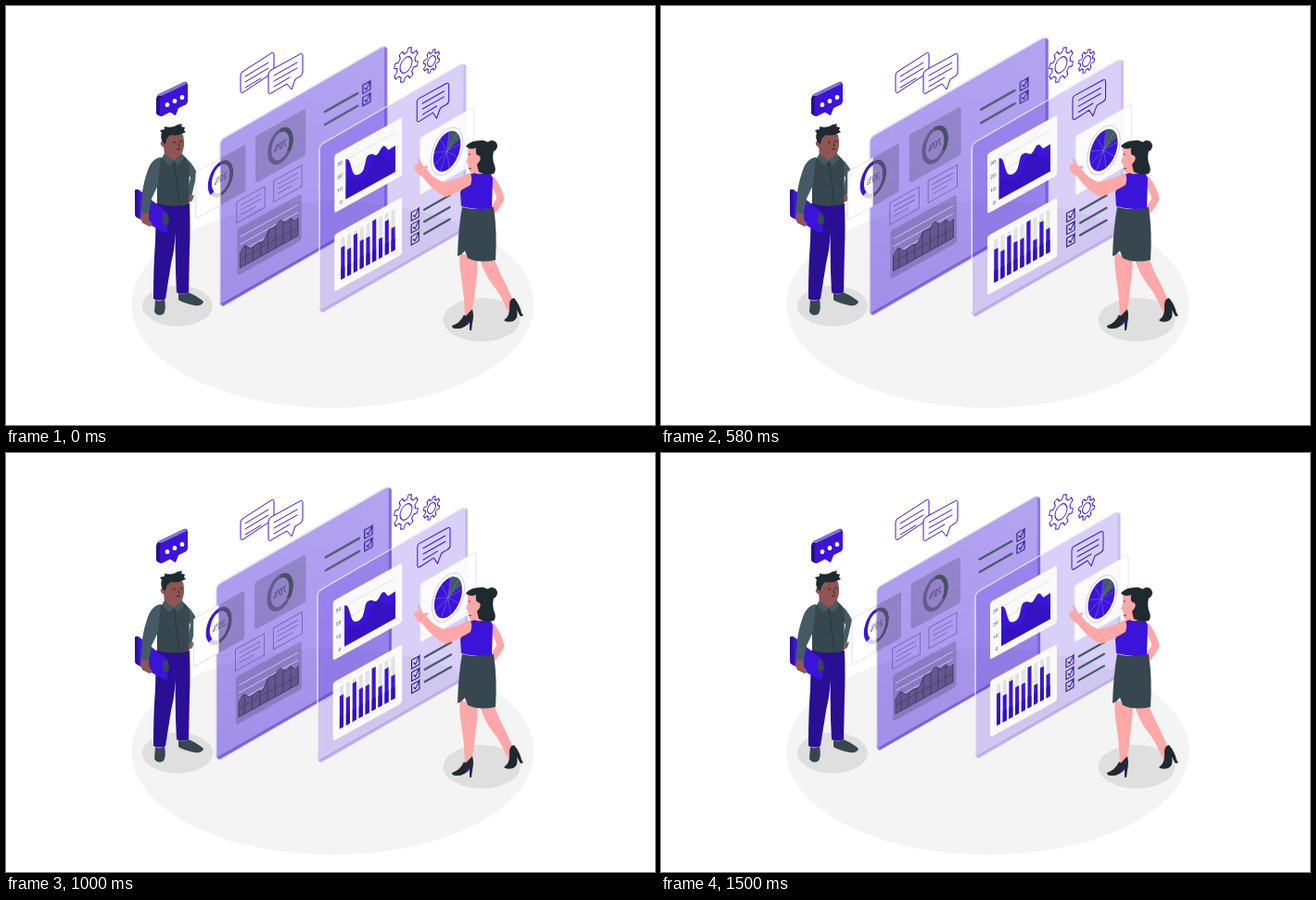
Recreate the animation shown at these times as an HTML page. Size 700 by 452 pixels, loop 1540 ms.

```html
<!DOCTYPE html>
<html lang="en">
<head>
<meta charset="utf-8">
<title>Dashboard presentation</title>
<style>
html, body { margin: 0; width: 100%; height: 100%; overflow: hidden; background: #fff; }
svg { display: block; width: 100vw; height: 100vh; }
text { font-family: Roboto, Arial, sans-serif; }
.beat { animation: beat 1540ms infinite linear; }
#back { transform-origin: 307.5px 182.5px; }
#slab { transform-origin: 321px 182.7px; }
#front { transform-origin: 421.3px 196.5px; }
@keyframes beat {
  0% { transform: scale(1.0115); animation-timing-function: cubic-bezier(.3, .35, .7, .8); }
  21.43% { transform: scale(1.0877); animation-timing-function: ease-out; }
  26.6% { transform: scale(1.098); animation-timing-function: ease-in; }
  35.06% { transform: scale(1.062); }
  37.66% { transform: scale(1.046); animation-timing-function: ease-out; }
  47.4% { transform: scale(1.002); }
  52% { transform: scale(.999); }
  57.14% { transform: scale(1); animation-timing-function: cubic-bezier(.35, .2, .7, .8); }
  73.38% { transform: scale(1.0777); animation-timing-function: ease-out; }
  78.3% { transform: scale(1.088); animation-timing-function: cubic-bezier(.5, 0, .8, .7); }
  86.36% { transform: scale(1.057); animation-timing-function: cubic-bezier(.3, .3, .6, 1); }
  97.4% { transform: scale(1); animation-timing-function: ease-in; }
  100% { transform: scale(1.0115); }
}
.main { fill: #3c14d9; }
.deep { fill: #2a0f94; }
.slate { fill: #37474f; }
.dark { fill: #1f2a30; }
.skin { fill: #ffa8a7; }
.brown { fill: #8f5553; }
.shade { fill: #000; fill-opacity: .16; }
.line { fill: none; stroke: #3c14d9; stroke-width: 1; stroke-linejoin: round; stroke-linecap: round; }
.faint { fill: none; stroke: #6f5db0; stroke-width: .8; }
.bar { fill: none; stroke: #455a64; stroke-width: 2.2; stroke-linecap: round; }
.check { fill: none; stroke: #2b1687; stroke-width: 1.1; }
</style>
</head>
<body>
<svg viewBox="0 0 700 452" preserveAspectRatio="none">
  <defs>
    <linearGradient id="glass" x1="0" y1="1" x2="1" y2="0">
      <stop offset="0" stop-color="#3c14d9" stop-opacity=".45"/>
      <stop offset="1" stop-color="#3c14d9" stop-opacity=".39"/>
    </linearGradient>
    <g id="box" class="check"><path d="M0 0H8V9H0ZM2 4L4 6.5L8.5 -1"/></g>
    <g id="note" class="faint"><path d="M0 0H30V22.5H0ZM4 6H26M4 11H26M4 16H20"/></g>
  </defs>

  <ellipse cx="352.5" cy="322" rx="217" ry="111.5" fill="#f4f4f4"/>
  <ellipse cx="185" cy="323.5" rx="38" ry="22" fill="#dfdfdf"/>
  <ellipse cx="513" cy="338.5" rx="41.5" ry="23.5" fill="#dfdfdf"/>

  <g id="man">
    <path class="deep" d="M162 213L198 213Q199 240 198 262L197 309Q190 312 184 309Q182 275 183 236Q183 258 178 278L172 316Q166 319 159 316Q159 280 161 255Z"/>
    <path class="slate" d="M161 317Q166 320 171 316Q173 327 170 332Q164 336 160 330Z"/>
    <path class="slate" d="M186 310Q192 312 197 309Q208 314 213 319Q212 324 203 323Q190 320 186 317Z"/>
    <path fill="#455a64" d="M190 161Q200 167 206 180L200 206Q199 211 196 213L196 201L199 185L192 174Z"/>
    <path class="brown" d="M197 205L203 204L201 210L196 213Z"/>
    <path class="slate" d="M166 164L190 160Q197 165 198 175L197 214Q180 218 163 213L163 190Z"/>
    <path d="M181 166L187 214" stroke="#263238" stroke-width=".8"/>
    <path class="brown" d="M170 150L190 150L190 162L181 167L171 162Z"/>
    <path class="brown" d="M169 139Q180 133 191 139Q194 152 189 160Q181 163 175 156L168 151Q165 147 169 145Z"/>
    <path class="dark" d="M169 147Q166 141 168 137L166 134L171 133L171 130Q180 132 185 128L190 127L189 130L193 131L192 134L194 136Q186 141 178 139Q173 141 172 149Z"/>
    <path d="M180 147h3M187 146h3M184 154q2 1 4 0M186 148l1 4" fill="none" stroke="#35211f" stroke-width="1"/>
    <path fill="#455a64" d="M171 159L181 167L176 172L168 164ZM181 167L190 159L192 165L185 172Z"/>
    <path class="main" d="M139 200Q139 197 143 198L174 223Q176 225 175 229L174 244Q173 246 170 244L141 228Q139 227 139 225Z"/>
    <path class="deep" d="M139 200Q139 197 142 198L143 229L140 227Z"/>
    <path class="slate" d="M171 222Q176 226 176 232Q174 238 170 235Q167 229 171 222Z"/>
    <path class="brown" d="M146 221L154 222L154 230L158 236L155 238L147 234L145 228Z"/>
    <path fill="#455a64" d="M167 163Q156 165 152 180Q149 188 147 201L145 222Q150 225 154 223L157 208L164 193Z"/>
  </g>

  <g id="chat">
    <path class="deep" d="M162 100Q162 97 165 95L192 82Q195 81 196 85L196 103Q195 106 192 107L186 110L183 118L176 114L167 119Q163 118 162 116Z"/>
    <path class="main" d="M166 101Q166 98 169 97L193 85Q196 84 196 87L196 103Q195 106 192 107L186 110L182 118L178 114L168 119Q166 119 166 117Z"/>
    <path d="M163 97Q163 96 165 95L192 82Q194 82 195 84L168 97Z" fill="#8672e8"/>
    <g fill="#fff">
      <ellipse cx="174" cy="106.5" rx="2.3" ry="2.6"/>
      <ellipse cx="182" cy="102.5" rx="2.3" ry="2.6"/>
      <ellipse cx="190" cy="98.5" rx="2.3" ry="2.6"/>
    </g>
  </g>

  <g id="back" class="beat">
    <g id="slab" class="beat">
      <g transform="translate(232 145) skewY(-30)">
        <rect width="174" height="175.5" rx="5" fill="url(#glass)"/>
        <path class="main" fill-opacity=".62" d="M1 174.500L4 178H174Q177 178 177 175.500V6L174 2V171.500Q174 175 171 175Z"/>
        <path d="M.5 172V6Q.5 .8 5 .8H172" fill="none" stroke="#fff" stroke-opacity=".75" stroke-width="1.5"/>
      </g>
    </g>

    <g transform="translate(206 179) skewY(-29)">
      <path d="M26 0H2Q0 0 0 2V48Q0 50 2 50H26Z" fill="#fff" fill-opacity=".95" stroke="#dcdcdc" stroke-width=".8"/>
      <path class="shade" d="M26 0H51Q53 0 53 2V48Q53 50 51 50H26Z"/>
      <g transform="translate(26.5 22)" fill="none" stroke-width="4">
        <ellipse rx="11.5" ry="16.5" stroke="#d9d5ea"/>
        <path d="M0 -16.5A11.5 16.5 0 0 1 0 16.5" stroke="#514c78"/>
        <path d="M0 -16.5A11.5 16.5 0 0 0 -9 10.5" stroke="#3c14d9"/>
        <text transform="scale(-1 1.3)" text-anchor="middle" y="2.5" font-size="7.5" fill="#554d78">30%</text>
      </g>
    </g>
    <g transform="translate(269.5 141) skewY(-29)">
      <rect class="shade" width="53.5" height="50" rx="3"/>
      <g transform="translate(26.5 25)" fill="none" stroke-width="4">
        <ellipse rx="11.5" ry="16.5" stroke="#655b8c"/>
        <path d="M0 -16.5A11.5 16.5 0 0 1 9 10.5" stroke="#455263"/>
        <text transform="scale(-1 1.3)" text-anchor="middle" y="2.5" font-size="7.5" fill="#3f3a5c">70%</text>
      </g>
    </g>
    <use href="#note" transform="translate(249.5 211) skewY(-29)"/>
    <use href="#note" transform="translate(289 188.5) skewY(-29)"/>
    <g transform="translate(250 240) skewY(-29)">
      <rect class="shade" width="68.5" height="50" rx="3"/>
      <path d="M3 10H65M3 18H65M3 26H65M3 34H65" stroke="#d8d0f3" stroke-width=".7"/>
      <path d="M3 27L8 22L15 29L22 27L28 29L34 19L40 20L46 16L52 22L57 20L62 26L65 24V43H3Z" fill="#5b5084" fill-opacity=".85" stroke="#3a3259" stroke-width=".7"/>
      <path d="M3 34H65M9 22V43M17 28V43M25 28V43M33 20V43M41 20V43M49 20V43M57 21V43" stroke="#352d58" stroke-width=".5"/>
    </g>
    <path class="bar" d="M343.500 114.800L378.500 95M343.500 128.500L378.500 108.500"/>
    <use href="#box" transform="translate(384 86.5) skewY(-29)"/>
    <use href="#box" transform="translate(384 99.5) skewY(-29)"/>
  </g>

  <path class="line" d="M255 71L286 51Q289 49 289 53L289 68Q289 71 286 73L256 93Q253 95 253 91L253 75Q253 72 255 71ZM258 76L283 61M258 82L283 67M258 88L275 78"/>
  <path class="line" style="fill:#fff" d="M286 69L317 52Q320 50 320 54L320 71Q320 74 317 76L312 79L308 90L303 84L286 94Q283 96 283 92L283 74Q283 71 286 69Z"/>
  <path class="line" d="M289 75L314 61M289 81L314 67M289 87L306 77"/>
  <g id="gears" class="line"></g>

  <g id="front" class="beat">
    <g transform="translate(338.5 150.5) skewY(-30)">
      <rect class="main" fill-opacity=".2" width="154" height="178.5" rx="5"/>
      <path class="main" fill-opacity=".28" d="M1 177.500L4 181H154Q157 181 157 178.500V6L154 2V174.500Q154 178 151 178Z"/>
      <path d="M.5 174V6Q.5 .8 5 .8H152" fill="none" stroke="#fff" stroke-opacity=".75" stroke-width="1.5"/>
    </g>

    <g transform="translate(355 161) skewY(-29)">
      <rect width="72" height="62" rx="2.5" fill="#fafafa"/>
      <path d="M12 12H65M12 26H65M12 40H65" stroke="#dedede" stroke-width=".7"/>
      <g id="scale" font-size="5" fill="#37474f" text-anchor="end"></g>
      <path class="main" d="M12 11.600C17 12 17 22 20 30C22 36 29 37 31 33C34 26 33 20 37 20.500C41 20 43 26 46 25C49 23 50 18.500 53 20C56 22 56 28 60 26.500L65 26V54H12Z"/>
      <path class="deep" fill-opacity=".35" d="M12 41Q17 30 24 40T38 34T51 29T65 37V54H12Z"/>
    </g>
    <g transform="translate(355 246) skewY(-29)">
      <rect width="72" height="61" rx="2.5" fill="#fafafa"/>
      <g id="bars"></g>
    </g>
    <g transform="translate(446 143) skewY(-30)">
      <rect width="58" height="61" rx="2" fill="#fff" fill-opacity=".9" stroke="#e6e4ee" stroke-width=".8"/>
      <g transform="translate(29 31)">
        <ellipse rx="17" ry="23.5" fill="#fff" stroke="#bdb9cc" stroke-width=".6"/>
        <ellipse class="main" rx="14.5" ry="20"/>
        <path fill="#455a64" d="M0 0L3 -19.500A14.500 20 0 0 1 14 -5Z"/>
        <g id="spokes" stroke="#8f80e4" stroke-width=".4"></g>
      </g>
    </g>
    <path class="line" d="M445 101L474 85Q477 83.500 477 87L477 103Q477 106 474 107.500L468 111L464 122L460 116L446 125Q443 127 443 123L443 105Q443 102 445 101ZM449 106L472 93M449 112L472 99M449 118L464 109"/>
    <g id="list"></g>
  </g>

  <g id="woman">
    <path d="M523 186Q531 197 533.5 208Q529 216 525 221" fill="none" stroke="#ffa8a7" stroke-width="8" stroke-linejoin="round"/>
    <path class="skin" d="M511 273L527 274Q532 288 539 300L548 320L544 331L540 327Q533 310 525 301Q516 289 511 273Z"/>
    <path class="skin" d="M489 266L509 273Q508 292 506 304Q505 318 502 332L495 336Q494 310 491.5 296Q489 282 489 266Z"/>
    <path class="dark" d="M481 345Q490 342 494 333Q496 336 499 331L503 327Q505 334 503 342L502 350L500 350L500 341Q494 349 485 348Q481 348 481 345Z"/>
    <path class="main" d="M495 345L500 338L499 343Z"/>
    <path class="dark" d="M537 339Q544 335 543 322Q543 316 548 315Q554 322 556 331L558 334L555 335L551 328Q553 337 547 340Q540 342 537 339Z"/>
    <path class="slate" d="M492 217Q508 221 526 217Q530 244 528 274Q510 278 498 272L495 264Q492 268 487 270Q488 238 492 217Z"/>
    <path class="skin" d="M503 172L515 173L518 184L500 185Z"/>
    <path class="main" d="M498 183L505 180Q512 183 519 179Q524 181 525 186L524 218Q508 221 491 216L490 201Q493 194 498 183Z"/>
    <path class="skin" d="M452 175Q462 187 472 190Q488 187 500 180Q504 184 501 193Q486 202 474 206Q460 199 449 184Z"/>
    <path class="skin" d="M444 164Q446 163 447 167L450 173L455 172Q456 174 453 176L457 180L452 186L444 181L440 175Q441 171 444 170L445 172Z"/>
    <circle class="dark" cx="524" cy="151" r="6"/>
    <path class="dark" d="M496 151Q502 144 515 145Q524 147 526 156Q524 166 527 172Q529 178 526 181Q517 183 510 179L505 160Z"/>
    <path class="skin" d="M498 153Q502 155 507 153Q506 160 509 161Q513 162 511 167L508 171Q509 177 505 180Q499 181 499 175L498 170L496 168L498 163Z"/>
    <path d="M499 160h2M499 175q2 1 3 0" fill="none" stroke="#4a2a2c" stroke-width=".9"/>
  </g>
</svg>
<script>
const put = (id, markup) => document.getElementById(id).innerHTML = markup;
const each = (n, f) => Array.from({ length: n }, (_, i) => f(i)).join("");

// Toothed wheel seen at an angle
function gear(x, y, r) {
  const teeth = 8, step = Math.PI * 2 / teeth;
  const at = (a, k) => `${(Math.cos(a) * r * k * .85).toFixed(1)} ${(Math.sin(a) * r * k * 1.12).toFixed(1)}`;
  const d = each(teeth, i => {
    const a = i * step + .2;
    return `${i ? "L" : "M"}${at(a, 1)}L${at(a + step * .35, 1)}L${at(a + step * .47, .75)}L${at(a + step * .88, .75)}`;
  });
  return `<g transform="translate(${x} ${y}) skewY(-29)"><path d="${d}Z"/>` +
    `<ellipse rx="${r * .42}" ry="${r * .52}"/></g>`;
}
put("gears", gear(431.5, 63.5, 15.5) + gear(459, 59.5, 10.5));

put("scale", each(4, i => `<text x="8.5" y="${14 + i * 14}">${30 - i * 10}</text>`));

const heights = [34, 28.5, 40, 30, 29.5, 44, 21, 36, 25];
put("bars", heights.map((h, i) => {
  const x = 7 + i * 6.7;
  const rect = (h, fill) => `<rect x="${x}" y="${52 - h}" width="4" height="${h}" fill="${fill}"/>`;
  return rect(44, "#e2e2e2") + rect(h, "#3c14d9") + rect(12, "#3011b5");
}).join(""));

put("spokes", each(9, i => {
  const a = i * Math.PI * 2 / 9 - 1.4;
  return `<path d="M0 0L${14.5 * Math.cos(a)} ${20 * Math.sin(a)}"/>`;
}));

put("list", each(3, i => {
  const y = 222.5 + i * 12.8;
  return `<use href="#box" transform="translate(437 ${y}) skewY(-29)"/>` +
    `<path class="bar" d="M450.7 ${y - 3}L478 ${y - 18.5}"/>`;
}));
</script>
</body>
</html>
```
